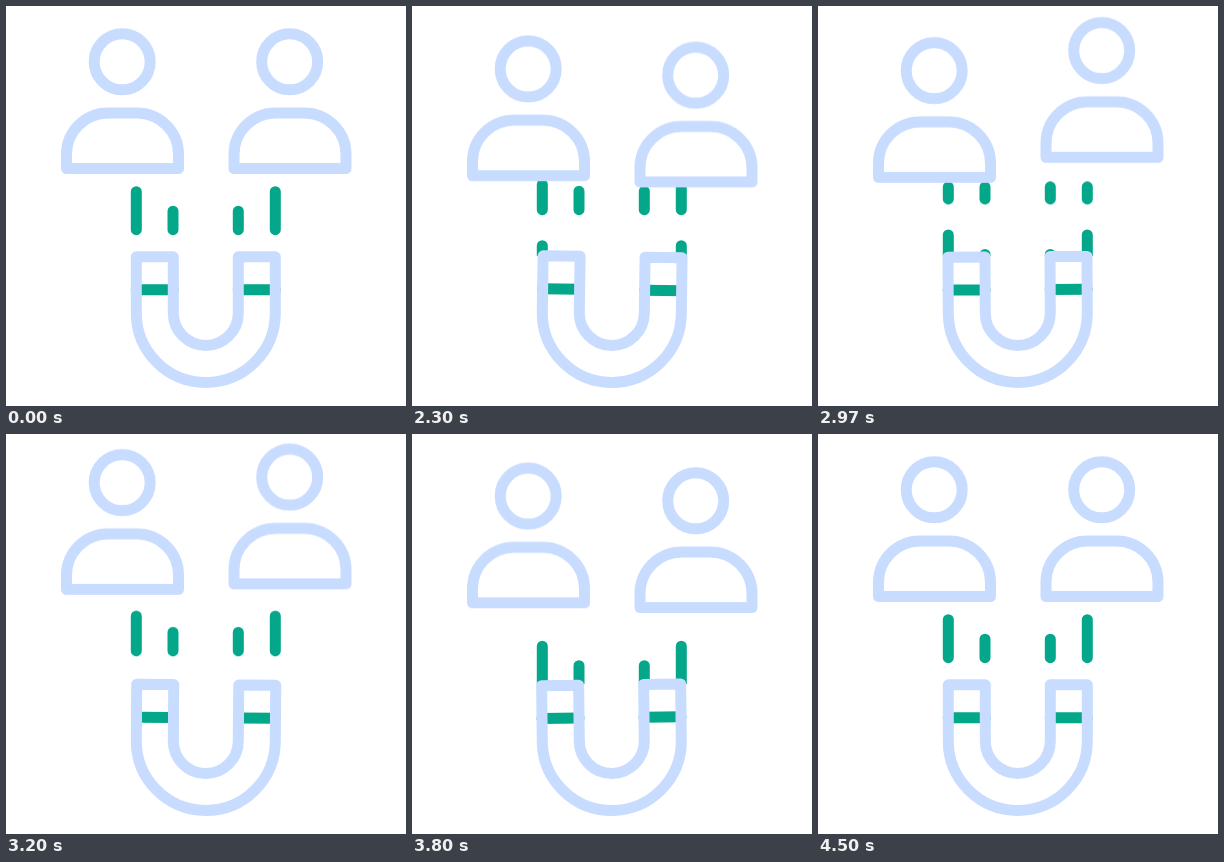
Write an HTML page without scripts that moves like this. It is 400 px wide and 400 px high and loops after 4.52 s.

```html
<!DOCTYPE html>
<html lang="en">
<head>
<meta charset="utf-8">
<title>Magnet attracting people</title>
<style>
  @property --active { syntax: "<number>"; inherits: true; initial-value: 0; }
  @property --swing { syntax: "<number>"; inherits: true; initial-value: -1; }
  @property --fall { syntax: "<number>"; inherits: true; initial-value: 0; }

  html, body { margin: 0; width: 100%; height: 100%; overflow: hidden; background: #fff; }

  svg {
    --loop: 4520ms;
    --drop: calc(var(--loop) / 26);
    --smooth: cubic-bezier(.333, 0, .667, 1);
    display: block;
    width: 100%;
    height: 100%;
    fill: none;
    stroke-width: 11;
    stroke-linecap: round;
    stroke-linejoin: round;
    animation:
      active var(--loop) step-end infinite,
      swing calc(var(--loop) / 112) ease-in-out infinite alternate,
      fall var(--drop) -86ms linear infinite;
  }
  .blue { stroke: #c8dcff; }
  .green { stroke: #04a789; }

  .left { animation: bob-left var(--loop) var(--smooth) infinite; }
  .right { animation: bob-right var(--loop) var(--smooth) infinite; }

  .magnet {
    transform-origin: 199.8px 307px;
    transform: rotate(calc(var(--active) * var(--swing) * .8deg));
  }
  .falling { transform: translateY(calc(var(--active) * var(--fall) * 74px)); }
  .fresh {
    opacity: var(--active);
    transform: translateY(calc((var(--fall) - 1) * 74px));
  }
  .fresh use {
    stroke-dasharray: 39 60;
    animation: grow var(--drop) -86ms linear infinite;
  }

  @keyframes active {
    0%, 99.55% { --active: 0; }
    44.36% { --active: 1; }
  }
  @keyframes swing { from { --swing: -1; } to { --swing: 1; } }
  @keyframes fall { from { --fall: 0; } to { --fall: 1; } }
  @keyframes grow {
    0%, 45% { stroke-dashoffset: 39px; opacity: 0; }
    45.1% { stroke-dashoffset: 39px; opacity: 1; }
    76% { stroke-dashoffset: 11px; opacity: 1; }
    100% { stroke-dashoffset: 0px; opacity: 1; }
  }
  @keyframes bob-left {
    0%, 44.25%, 99.56%, 100% { transform: translateY(0); }
    60.18% { transform: translateY(19px); }
    75.22% { transform: translateY(-14px); }
    90.27% { transform: translateY(18px); }
  }
  @keyframes bob-right {
    0%, 44.25%, 99.56%, 100% { transform: translateY(0); }
    54.65% { transform: translateY(19px); }
    68.14% { transform: translateY(-14px); }
    88.94% { transform: translateY(15px); }
  }
</style>
</head>
<body>
<svg viewBox="0 0 400 400">
  <defs>
    <g id="person">
      <circle cx="116.2" cy="55.8" r="28"/>
      <path d="M60.5 162.5v-14a41.5 41.5 0 0 1 41.5-41.5h29a41.5 41.5 0 0 1 41.5 41.5v14z"/>
    </g>
    <!-- drawn upwards so the dash grows from the lower end -->
    <path id="lines" d="M130.3 223.7v-38M167 223.7v-18.5M232.3 223.7v-18.5M269.3 223.7v-38"/>
    <clipPath id="above-magnet"><path d="M0 0h400v250H0z"/></clipPath>
  </defs>

  <g class="green" clip-path="url(#above-magnet)">
    <g class="falling"><use href="#lines"/></g>
    <g class="fresh"><use href="#lines"/></g>
  </g>

  <g class="magnet">
    <path class="green" d="M130.3 283.7h37M232.3 283.7h37"/>
    <path class="blue" d="M130.3 250.8V307a69.5 69.5 0 0 0 139 0v-56.2h-37V307a32.5 32.5 0 0 1-65 0v-56.2z"/>
  </g>

  <g class="blue">
    <g class="left"><use href="#person"/></g>
    <g class="right"><use href="#person" x="167.5"/></g>
  </g>
</svg>
</body>
</html>
```
